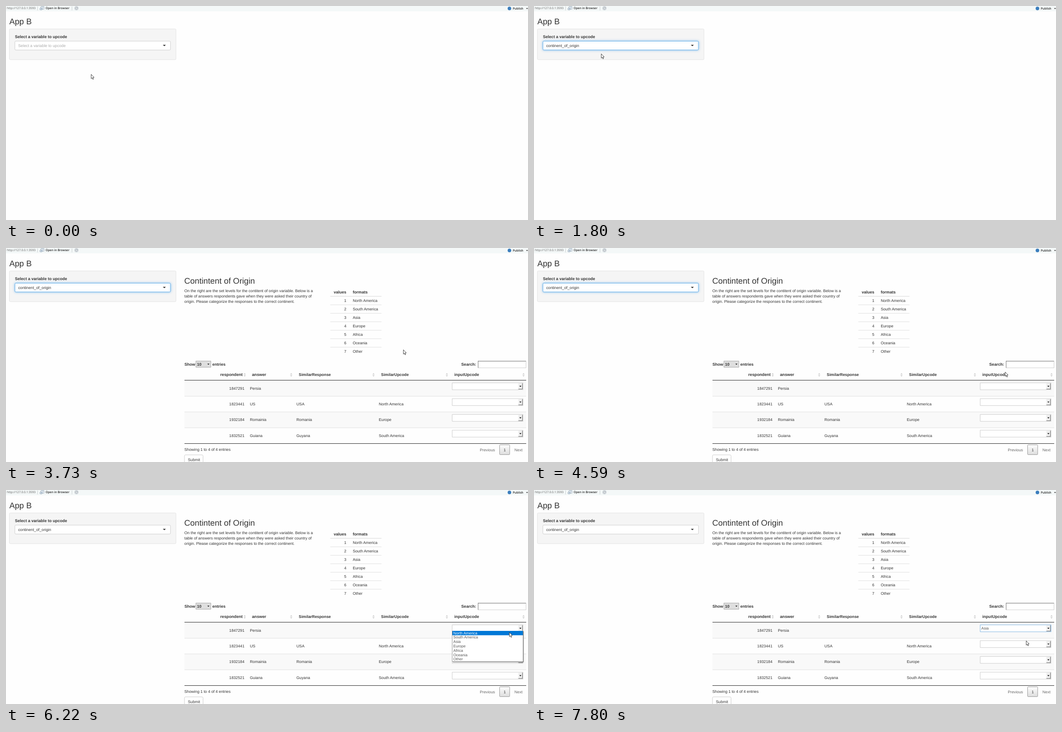
Write an HTML page with a canvas that moves like this. It is 1167x480 px and loops after 8 s.

```html
<!DOCTYPE html>
<html lang="en">
<head>
<meta charset="utf-8">
<title>App B</title>
<style>
html, body { margin: 0; width: 100%; height: 100%; overflow: hidden; background: #fefefe; }
canvas { display: block; }
</style>
</head>
<body>
<canvas id="stage" width="1167" height="480"></canvas>
<script>
const ctx = document.getElementById('stage').getContext('2d');
const LOOP = 8000;
const SANS = '"Liberation Sans", Arial, sans-serif';
const UI = '"Open Sans", "Noto Sans", sans-serif';
const LEVELS = ['North America', 'South America', 'Asia', 'Europe', 'Africa', 'Oceania', 'Other'];
const ROWS = [
  ['1847291', 'Persia', '', ''],
  ['1823441', 'US', 'USA', 'North America'],
  ['1932184', 'Romainia', 'Romania', 'Europe'],
  ['1832521', 'Guiana', 'Guyana', 'South America']
];
const ROW_H = 35.4;
const MENU = { x: 997.5, y: 315.5, w: 158.5, h: 69.5, row: 9.78 };

// Key times in ms
const T = { caret: 940, open: 1100, pick: 1800, text: 1860, tables: 2060, focus: 4970, menu: 5070, done: 5320, choose: 7534 };

// Pointer moves: start, end, steps, target x, target y
const START = [190, 153];
const MOVES = [
  [360, 940, 7, 161, 94],
  [1210, 1600, 5, 150, 107],
  [2060, 2060, 1, 157, 107],
  [2830, 3190, 5, 486, 149],
  [3560, 3730, 3, 888, 228],
  [3930, 3930, 1, 906, 228],
  [4080, 4860, 10, 1151, 311],
  [5900, 5990, 2, 1133, 314],
  [6140, 6220, 2, 1125, 319],
  [6400, 6400, 1, 1124, 319],
  [6860, 6860, 1, 1123, 319],
  [7090, 7356, 4, 1115, 337],
  [7622, 7800, 3, 1100, 338]
];

function pointerAt(t) {
  let [x, y] = START;
  for (const [from, to, steps, tx, ty] of MOVES) {
    if (t < from) break;
    const k = t >= to ? 1 : (Math.floor((t - from) / (to - from) * (steps - 1)) + 1) / steps;
    x += (tx - x) * k;
    y += (ty - y) * k;
  }
  return [x, y];
}

function text(str, x, y, o = {}) {
  const { size = 8.72, weight = 400, color = '#333', align = 'left', font = SANS } = o;
  ctx.font = `${weight} ${size}px ${font}`;
  ctx.fillStyle = color;
  ctx.textAlign = align;
  ctx.fillText(str, x, y);
}

function bold(str, x, y, size = 9.05, align = 'left') {
  text(str, x, y, { size, weight: 700, align });
}

function rect(x, y, w, h, color) {
  ctx.fillStyle = color;
  ctx.fillRect(x, y, w, h);
}

function box(x, y, w, h, r, fill, stroke, line = 1) {
  ctx.beginPath();
  ctx.roundRect(x, y, w, h, r);
  ctx.fillStyle = fill;
  ctx.fill();
  ctx.strokeStyle = stroke;
  ctx.lineWidth = line;
  ctx.stroke();
}

function poly(points, fill) {
  ctx.beginPath();
  points.forEach(([x, y]) => ctx.lineTo(x, y));
  ctx.closePath();
  ctx.fillStyle = fill;
  ctx.fill();
}

// Triangle with its base centre at (x, y); negative h points up
function arrow(x, y, half, h, color) {
  poly([[x - half, y], [x + half, y], [x, y + h]], color);
}

function withShadow(color, blur, dy, draw) {
  ctx.save();
  ctx.shadowColor = color;
  ctx.shadowBlur = blur;
  ctx.shadowOffsetY = dy;
  draw();
  ctx.restore();
}

function toolbar() {
  const ui = { size: 6.65, font: UI, color: '#222', weight: 600 };
  rect(0, 0, 1167, 12, '#f4f8f8');
  text('http://127.0.0.1:3593', 2, 7.4, { size: 6.6, font: UI, color: '#555' });
  rect(70, 1, 1, 9, '#ccd2d4');
  rect(147, 1, 1, 9, '#ccd2d4');
  box(78, 1.5, 7, 5.5, 0.5, '#fff', '#7d93a8', 0.9);
  box(76, 5, 4.5, 3.5, 0.5, '#e6eef5', '#7d93a8', 0.9);
  ctx.beginPath();
  ctx.moveTo(79.5, 6);
  ctx.lineTo(83, 3);
  ctx.strokeStyle = '#5b83ab';
  ctx.stroke();
  text('Open in Browser', 88.5, 7.4, ui);
  box(153.5, 1, 8, 8, 4, '#f7f9fa', '#a3adb5', 0.8);
  ctx.beginPath();
  ctx.arc(157.5, 5, 2.1, 0.3, 5.2);
  ctx.strokeStyle = '#75828c';
  ctx.lineWidth = 0.9;
  ctx.stroke();
  arrow(159.2, 3.6, 1.3, 1.8, '#75828c');
  ctx.beginPath();
  ctx.arc(1125.5, 5.5, 4, 0, 7);
  ctx.fillStyle = '#3a7dbd';
  ctx.fill();
  text('Publish', 1133, 7.7, ui);
  arrow(1164.8, 4.8, 2, 2.2, '#222');
}

function sidebar(t) {
  const open = t >= T.open && t < T.pick;
  const focused = t >= T.open && t < T.focus;
  text('App B', 7.4, 41, { size: 18.35 });
  box(7.5, 51.5, 372.5, 68.8, 2, '#f5f5f5', '#e3e3e3');
  bold('Select a variable to upcode', 20, 72.3);
  const field = () => box(19.8, 78.8, 348, 20, 2.5, '#fff', focused ? '#66afe9' : '#ccc');
  if (focused) withShadow('rgba(102,175,233,.7)', 5, 0, field);
  else field();
  if (t < T.pick) text('Select a variable to upcode', 27.2, 91.8, { size: 8.8, color: '#aaa' });
  else text('continent_of_origin', 27.2, 91.8);
  if (t >= T.caret && t < T.caret + 530) rect(27, 82.5, 1, 12.5, '#555');
  if (open) arrow(354, 89.9, 3.3, -3.2, '#333');
  else arrow(354, 87, 3.3, 3.2, '#333');
  if (open) {
    withShadow('rgba(0,0,0,.25)', 6, 3, () => rect(19.5, 100.5, 348.5, 22.5, '#fff'));
    rect(20, 103.5, 347.5, 16.8, '#f5f5f5');
    text('continent_of_origin', 27.2, 115);
  }
}

function submit(y) {
  box(399, y, 41.5, 20, 2.5, '#fff', '#ccc');
  text('Submit', 406.8, y + 13.6);
}

function intro() {
  text('Contintent of Origin', 398.5, 79.7, { size: 18.35 });
  [
    'On the right are the set levels for the contitent of origin variable. Below is a',
    'table of answers respondents gave when they were asked their country of',
    'origin. Please categorize the responses to the correct continent.'
  ].forEach((line, i) => text(line, 398.8, 98.7 + i * 12.2));
}

function levelsTable() {
  bold('values', 760.8, 101.7, 9.05, 'right');
  bold('formats', 775.3, 101.7);
  rect(725, 107.8, 114.5, 1.2, '#ddd');
  LEVELS.forEach((name, i) => {
    const y = 121.2 + i * 19;
    text(i + 1, 760.8, y, { align: 'right' });
    text(name, 775.2, y);
    if (i) rect(725, 108 + i * 19, 114.5, 0.9, '#ddd');
  });
}

function combo(i, value, border) {
  const y = 302.5 + i * ROW_H;
  box(997.5, y, 158.5, 15.5, 0, '#fff', border);
  if (value) text(value, 1000, y + 10.8, { size: 8.5, color: '#555' });
  rect(1145.5, y + 1, 9.5, 13.5, '#eee');
  rect(1154, y + 1, 1, 13.5, '#666');
  rect(1145.5, y + 13.5, 9.5, 1, '#666');
  arrow(1150, y + 6.5, 2.3, 2.7, '#111');
}

function answersTable(t) {
  bold('Show', 399, 263.6);
  box(424.5, 253.5, 33.5, 14, 0, '#dedede', '#a9a9a9');
  bold('10', 427, 263.6);
  arrow(452.5, 259.4, 2.4, 2.7, '#111');
  bold('entries', 461.2, 263.6);
  bold('Search:', 1051, 264, 9.05, 'right');
  box(1055.5, 253.8, 107, 15, 0, '#fff', '#ccc');
  rect(1055, 253.3, 107.5, 1, '#777');
  rect(1055, 253.3, 1, 15.5, '#777');

  bold('respondent', 529, 287.3, 9.2, 'right');
  bold('answer', 550, 287.3, 9.2);
  bold('SimilarResponse', 654.5, 287.3, 8.85);
  bold('SimilarUpcode', 838.5, 287.3, 8.85);
  bold('inputUpcode', 1002.3, 287.3);
  for (const x of [533.7, 637.6, 821.6, 985.6, 1157]) {
    arrow(x, 283.8, 2.5, -3.6, '#d2d2d2');
    arrow(x, 285.2, 2.5, 3.6, '#d2d2d2');
  }

  ROWS.forEach(([id, ...cells], i) => {
    const y = 297 + i * ROW_H;
    if (i % 2 === 0) rect(399, y, 764, ROW_H, '#f9f9f9');
    if (i) rect(399, y - 0.5, 764, 0.9, '#ddd');
    text(id, 533, y + 20.5, { align: 'right' });
    cells.forEach((cell, c) => text(cell, [545.3, 649.3, 833.5][c], y + 20.5));
  });
  rect(399, 296, 764, 1.1, '#333');
  rect(399, 438, 764, 1.1, '#333');

  const active = t >= T.focus && (t < T.done || t >= T.choose);
  ROWS.forEach((_, i) => combo(i, !i && t >= T.choose && 'Asia', !i && active ? '#7fb4e3' : '#ccc'));

  text('Showing 1 to 4 of 4 entries', 398.8, 455.2);
  text('Previous', 1059.2, 455.7, { color: '#666' });
  const shade = ctx.createLinearGradient(0, 441, 0, 464);
  shade.addColorStop(0, '#fff');
  shade.addColorStop(1, '#dcdcdc');
  box(1103.5, 441.5, 22.5, 22, 1.2, shade, '#979797');
  text('1', 1114.8, 455.7, { align: 'center' });
  text('Next', 1136.8, 455.7, { color: '#666' });
}

// The list slides down from under the field, bottom rows first
function menu(t, pointerY) {
  const { x, y, w, h, row } = MENU;
  const phase = Math.min(3, Math.floor((t - T.menu) / 80));
  const shown = t >= T.done ? h : [12, 30, 50][Math.min(phase, 2)];
  const hot = Math.max(0, Math.floor((pointerY - y) / row));
  if (shown === h) rect(x + 1.5, y + 1.5, w, h, '#888');
  rect(x, y, w, shown, '#fff');
  ctx.save();
  ctx.beginPath();
  ctx.rect(x, y, w, shown);
  ctx.clip();
  LEVELS.forEach((name, i) => {
    const top = y + shown - h + 0.5 + i * row;
    if (i === hot) rect(x, top, w, row, '#0078d7');
    text(name, 1000, top + 7.7, { size: 8.5, color: i === hot ? '#fff' : '#555' });
  });
  ctx.restore();
  ctx.strokeStyle = '#8a8a8a';
  ctx.lineWidth = 0.9;
  ctx.beginPath();
  ctx.moveTo(x, y);
  ctx.lineTo(x, y + shown);
  ctx.lineTo(x + w, y + shown);
  ctx.lineTo(x + w, y);
  ctx.stroke();
}

function pointer(x, y) {
  const shape = [[0.4, 0.3], [0.4, 10], [2.6, 8], [4.1, 11.6], [5.6, 11], [4.1, 7.5], [7, 7.2]];
  poly(shape.map(([px, py]) => [x + px, y + py]), '#fff');
  ctx.strokeStyle = '#222';
  ctx.lineWidth = 0.85;
  ctx.stroke();
}

function draw(t) {
  const [px, py] = pointerAt(t);
  rect(0, 0, 1167, 480, '#fefefe');
  toolbar();
  sidebar(t);
  if (t >= T.text) {
    intro();
    submit(t < T.tables ? 343 : 464);
  }
  if (t >= T.tables) {
    levelsTable();
    answersTable(t);
  }
  if (t >= T.menu && t < T.choose) menu(t, py);
  pointer(px, py);
}

ctx.textRendering = 'geometricPrecision';
const began = performance.now();
function tick() {
  draw((performance.now() - began) % LOOP);
  requestAnimationFrame(tick);
}
tick();
</script>
</body>
</html>
```
